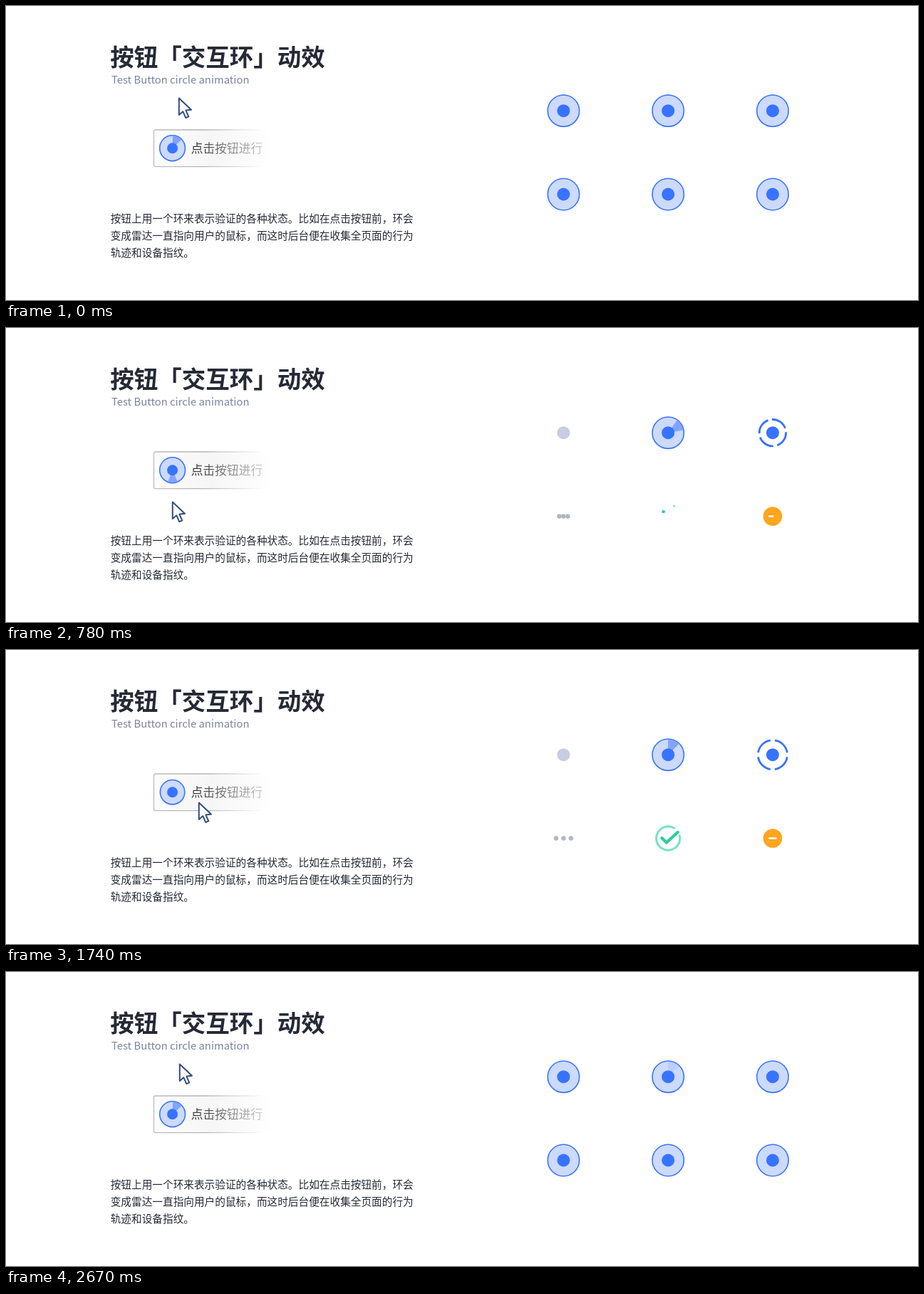
An HTML page with a canvas for the animation above (2700 ms loop, 1280 px wide and 413 px high).

```html
<!DOCTYPE html>
<html lang="zh-CN">
<head>
<meta charset="utf-8">
<title>按钮「交互环」动效</title>
<style>
  html, body { margin: 0; width: 100%; height: 100%; overflow: hidden; background: #fff; }
  svg, canvas { position: absolute; left: 0; top: 0; width: 1280px; height: 413px; }
  text { font-family: "Noto Sans CJK SC", "Noto Sans CJK", sans-serif; fill: #262a36; }
  .title { font-size: 33.5px; font-weight: 700; }
  .sub { font-size: 14.8px; font-weight: 500; fill: #7d83a0; }
  .body { font-size: 14.66px; }
  .label { font-size: 16.75px; fill: url(#ink); }
</style>
</head>
<body>
<svg viewBox="0 0 1280 413">
  <defs>
    <linearGradient id="ink" gradientUnits="userSpaceOnUse" x1="260" x2="362">
      <stop offset="0" stop-color="#2c2c2c"/>
      <stop offset=".5" stop-color="#858585"/>
      <stop offset="1" stop-color="#cfcfcf"/>
    </linearGradient>
    <linearGradient id="edge" gradientUnits="userSpaceOnUse" x1="207" x2="362">
      <stop offset="0" stop-color="#bdbdbd"/>
      <stop offset=".45" stop-color="#b4b4b4"/>
      <stop offset="1" stop-color="#fff"/>
    </linearGradient>
    <linearGradient id="face" gradientUnits="userSpaceOnUse" x1="207" x2="372">
      <stop offset="0" stop-color="#fdfdfd"/>
      <stop offset=".5" stop-color="#f6f6f6"/>
      <stop offset="1" stop-color="#fff"/>
    </linearGradient>
  </defs>
  <text class="title" x="146.3" y="84">按钮「交互环」动效</text>
  <text class="sub" x="148" y="108.7">Test Button circle animation</text>
  <rect x="207.5" y="174" width="165" height="51.6" rx="2" fill="url(#face)"/>
  <path d="M362 174H209.5Q207.5 174 207.5 176V223.6Q207.5 225.6 209.5 225.6H362"
        fill="none" stroke="url(#edge)" stroke-width="1.3"/>
  <text class="label" x="259.7" y="206.2">点击按钮进行</text>
  <text class="body" x="146.7" y="304.4">按钮上用一个环来表示验证的各种状态。比如在点击按钮前，环会</text>
  <text class="body" x="146.7" y="328.4">变成雷达一直指向用户的鼠标，而这时后台便在收集全页面的行为</text>
  <text class="body" x="146.7" y="352.4">轨迹和设备指纹。</text>
</svg>
<canvas width="1280" height="413"></canvas>
<script>
const g = document.querySelector('canvas').getContext('2d');
const LOOP = 2700, STEP = 30, MIRROR = 3120;
const BLUE = '#3873ff', PALE = '#ccdafe', BEAM = '#82a4fb';
const COLS = [782.5, 929.3, 1076], ROWS = [147.2, 264.5];
const rad = deg => deg * Math.PI / 180;

// Smooth value through [time, value] keys, without overshoot, held at both ends.
function track(t, keys) {
  const last = keys.length - 1;
  if (t <= keys[0][0]) return keys[0][1];
  if (t >= keys[last][0]) return keys[last][1];
  const slope = i => (keys[i + 1][1] - keys[i][1]) / (keys[i + 1][0] - keys[i][0]);
  const tangent = i => {
    if (i === 0 || i === last) return 0;
    const a = slope(i - 1), b = slope(i);
    return a * b > 0 ? 2 * a * b / (a + b) : 0;
  };
  const i = keys.findIndex(k => k[0] > t) - 1;
  const h = keys[i + 1][0] - keys[i][0], s = (t - keys[i][0]) / h, r = 1 - s;
  return keys[i][1] * r * r * (1 + 2 * s) + keys[i + 1][1] * s * s * (3 - 2 * s)
    + h * s * r * (tangent(i) * r - tangent(i + 1) * s);
}

function disc(x, y, r, color, alpha = 1) {
  g.globalAlpha = alpha;
  g.fillStyle = color;
  g.beginPath();
  g.arc(x, y, Math.max(r, 0), 0, 7);
  g.fill();
  g.globalAlpha = 1;
}

function stroke(color, width, cap = 'butt') {
  g.strokeStyle = color;
  g.lineWidth = width;
  g.lineCap = cap;
  g.stroke();
}

function halo(x, y, r, alpha = 1, width = 1.6) {
  disc(x, y, r, PALE, alpha);
  g.globalAlpha = alpha;
  stroke(BLUE, width);
  g.globalAlpha = 1;
}

// Beam of 45 degrees; the angle is clockwise from the top.
function radar(x, y, r, dot, angle, alpha) {
  halo(x, y, r);
  g.globalAlpha = alpha;
  g.fillStyle = BEAM;
  g.beginPath();
  g.moveTo(x, y);
  g.arc(x, y, r - .8, rad(angle - 112.5), rad(angle - 67.5));
  g.fill();
  g.globalAlpha = 1;
  disc(x, y, dot, BLUE);
}

// The ring closes onto its dot, which turns into a dot of another colour and size.
function morph(x, y, u, color, size) {
  const p = track(u, [[460, 0], [640, 1]]);
  const r = 9 + (size - 9) * track(u, [[540, 0], [720, 1]]);
  if (p < 1) halo(x, y, 22.2 - 12 * p, 1 - p);
  if (r <= 0) return;
  disc(x, y, r, BLUE, p < 1 ? 1 : 0);
  disc(x, y, r, color, p);
}

function spinner(x, y, u) {
  const open = track(u, [[470, 0], [660, 1]]);
  const r = track(u, [[460, 22.2], [660, 18], [780, 18.7], [1000, 20.6]]);
  const left = 1 - Math.min(1, Math.max(0, (u - 460) / 640));
  const turn = -90 * left ** 3, gap = 8.5 * open;
  disc(x, y, r, PALE, 1 - open);
  if (u > 1060) {
    g.save();
    g.beginPath();
    g.arc(x, y, 20, 0, 7);
    g.clip();
    g.fillStyle = '#a9def8';
    g.fillRect(x - 21, y - 19.5 + (u - 1110) * 39 / 270, 42, 5);
    g.restore();
  }
  for (let a = turn; a < turn + 360; a += 90) {
    g.beginPath();
    g.arc(x, y, r, rad(a + gap), rad(a + 90 - gap));
    stroke(BLUE, 1.6 + 1.2 * open);
  }
  disc(x, y, 9, BLUE);
}

function dots(x, y, u) {
  morph(x, y, u, '#abb9c4', 3.2);
  const gap = track(u, [[680, 0], [750, 4.5], [780, 6], [920, 10.4]]);
  if (gap) for (const k of [-1, 1]) disc(x + k * gap, y, 3.2, '#abb9c4');
}

function check(x, y, u) {
  morph(x, y, u, '#2fce96', 0);
  if (u < 730) return;
  const sweep = track(u, [[770, 0], [1110, 288], [1300, 314]]);
  g.beginPath();
  g.arc(x, y, 16.6, rad(-59), rad(-59.1 - sweep), true);
  stroke('#74e3c0', 3, 'round');
  const length = track(u, [[840, 0], [1110, 27], [1300, 30.8]]);
  if (length > 0) {
    g.setLineDash([length, 99]);
    g.beginPath();
    g.moveTo(x - 8.8, y - .5);
    g.lineTo(x - 2.3, y + 6);
    g.lineTo(x + 13.5, y - 8.5);
    g.lineJoin = 'miter';
    stroke('#2fce96', 4.2, 'round');
    g.setLineDash([]);
  } else {
    disc(x + track(u, [[750, 0], [780, -6.6], [840, -8.8]]),
      y + track(u, [[750, 0], [780, -6.5], [840, -.5]]),
      track(u, [[735, 0], [750, .8], [780, 2.3]]), '#2fce96');
  }
}

function minus(x, y, u) {
  morph(x, y, u, '#ffa51f', 13.3);
  const length = track(u, [[700, 0], [750, 2.6], [780, 4.8], [900, 9]]);
  if (!length) return;
  g.beginPath();
  g.moveTo(x - 4.5, y);
  g.lineTo(x - 4.5 + length, y);
  stroke('#fff', 2.7, 'round');
}

const PATH = [[0, 242, 128], [330, 184, 147], [430, 169, 175], [540, 177, 210], [780, 233, 243],
  [1110, 260, 233], [1740, 270, 213], [2370, 269, 183], [2670, 243, 128], [LOOP, 242, 128]];
const PATH_X = PATH.map(([t, x]) => [t, x]), PATH_Y = PATH.map(([t, , y]) => [t, y]);
const ARROW = new Path2D('M.8 1.5V25L6.3 20.2 10.3 29.2 14.3 27.4 10.4 18.6 18 17.8Z');

function button(t) {
  const x = track(t, PATH_X), y = track(t, PATH_Y), cx = 233.6, cy = 199.7;
  const aim = Math.atan2(x + 9 - cx, cy - y - 15) * 180 / Math.PI + 7;
  const active = track(t, [[1260, 1], [1380, 0], [2430, 0], [2520, 1]]);
  radar(cx, cy, 17.2 + .7 * active, 7.5, aim, active);
  g.save();
  g.translate(x, y);
  g.fillStyle = '#fff';
  g.fill(ARROW);
  g.lineJoin = 'round';
  g.lineWidth = 2;
  g.strokeStyle = '#344d7e';
  g.stroke(ARROW);
  g.restore();
}

function draw(now) {
  const t = Math.floor(now % LOOP / STEP) * STEP;
  const u = Math.min(t, MIRROR - t); // the six states play forward, then back
  const swing = Math.min(1, Math.max(0, (u - 520) / 850));
  const [a, b, c] = COLS, [top, low] = ROWS;
  g.clearRect(0, 0, 1280, 413);
  morph(a, top, u, '#c7cde0', 9);
  radar(b, top, 22.2, 9, 22 + 38 * Math.sin(swing * 2 * Math.PI), track(u, [[425, 0], [510, 1]]));
  spinner(c, top, u);
  dots(a, low, u);
  check(b, low, u);
  minus(c, low, u);
  button(t);
}

const start = performance.now();
function frame() {
  draw(performance.now() - start);
  requestAnimationFrame(frame);
}
frame();
</script>
</body>
</html>
```
